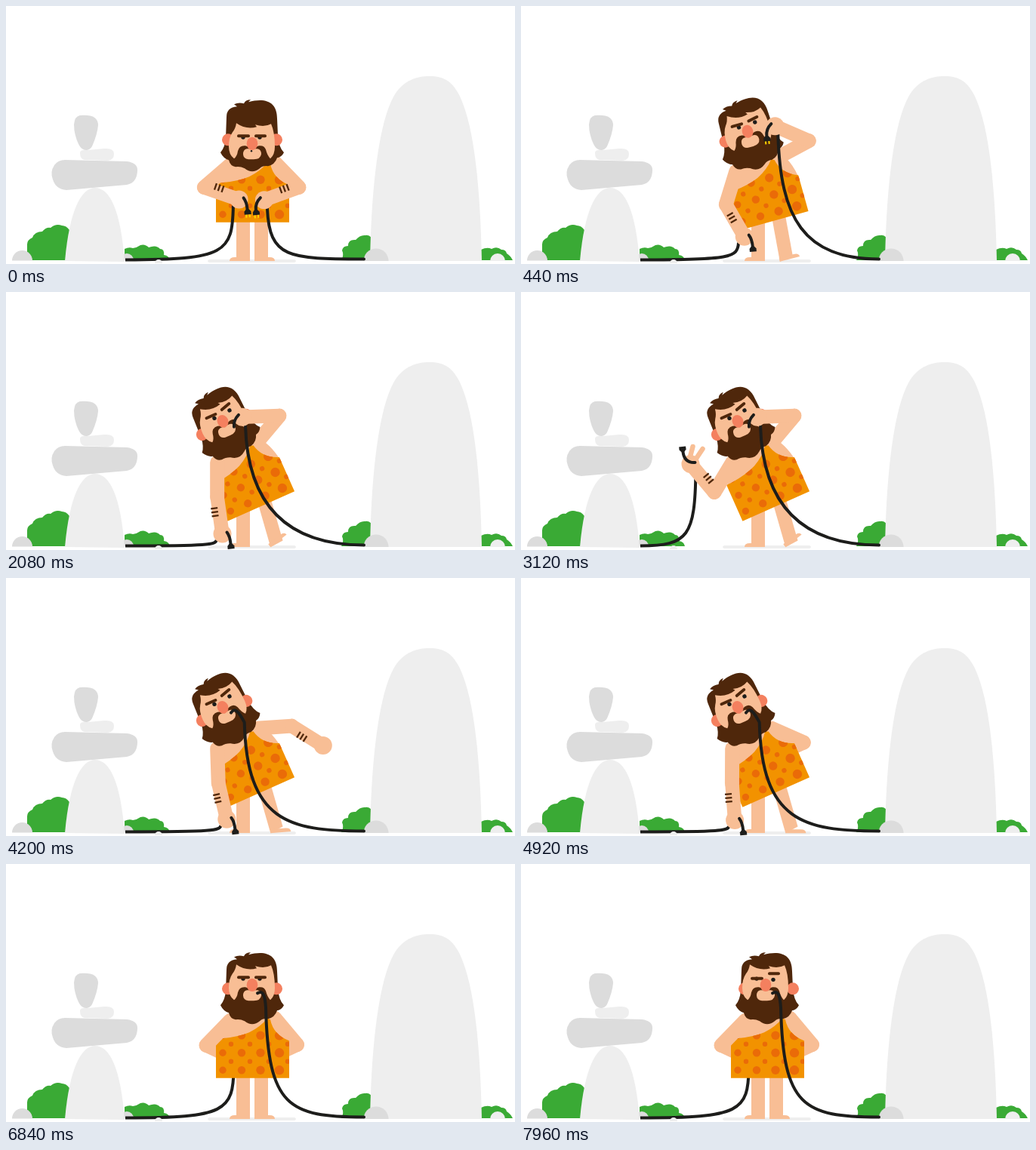
An HTML page with a canvas that plays this animation: 674x342 px, repeating every 8 s.

```html
<!DOCTYPE html>
<html lang="en">
<head>
<meta charset="utf-8">
<title>Caveman with cables</title>
<style>
html, body { margin: 0; width: 100%; height: 100%; overflow: hidden; background: #fff; }
canvas { display: block; width: 674px; height: 342px; }
</style>
</head>
<body>
<canvas id="stage" width="674" height="342"></canvas>
<script>
const ctx = document.getElementById('stage').getContext('2d');
const LOOP = 8000, RAD = Math.PI / 180;
const SKIN = '#f8be95', HAIR = '#4f270b', DRESS = '#f29200', SPOT = '#ea6b08', FLUSH = '#f4805f',
  CABLE = '#1d1d1b', LIGHT = '#eeeeee', STONE = '#dcdcdc', LEAF = '#3aaa35', YELLOW = '#ffd500', RED = '#e30613';

// Drawing helpers
const fill = (d, color) => { ctx.fillStyle = color; ctx.fill(new Path2D(d)); };
const stroke = (d, color, width, cap = 'round') => {
  Object.assign(ctx, { strokeStyle: color, lineWidth: width, lineCap: cap });
  ctx.stroke(new Path2D(d));
};
const oval = (x, y, rx, color, ry = rx) => {
  ctx.fillStyle = color;
  ctx.beginPath();
  ctx.ellipse(x, y, rx, ry, 0, 0, 7);
  ctx.fill();
};
const dome = (x, y, r, color) => fill(`M${x - r} ${y}A${r} ${r} 0 0 1 ${x + r} ${y}Z`, color);
const group = (draw, x = 0, y = 0, angle = 0) => {
  ctx.save();
  ctx.translate(x, y);
  ctx.rotate(angle * RAD);
  draw();
  ctx.restore();
};

// Smooth rise from 0 to 1 between two times
const rise = (t, from, to) => {
  const u = Math.max(0, Math.min(1, (t - from) / (to - from)));
  return u * u * (3 - 2 * u);
};
const pulse = (t, a, b, c, d) => rise(t, a, b) - rise(t, c, d);

// Arm poses: angles of upper arm and forearm; each move starts and ends at the given times
const LEFT_START = [139, 19], RIGHT_START = [46, 160];
const LEFT_MOVES = [
  { from: 200, to: 600, pose: [90, 82] },      // down to the ground
  { from: 2300, to: 2750, pose: [121, 230] },  // plug held up
  { from: 3450, to: 3850, pose: [88, 77] },
  { from: 4700, to: 5100, pose: [92, 92] },
  { from: 5960, to: 6300, pose: [134, 25] }    // behind the back
];
const RIGHT_MOVES = [
  { from: 200, to: 640, pose: [-84, 236] },    // plug overhead
  { from: 1350, to: 1680, pose: [-50, 178] },  // plug to the mouth
  { from: 3400, to: 3650, pose: [-45, 290] },
  { from: 3650, to: 4100, pose: [-4, 392] },   // flung out
  { from: 4250, to: 4700, pose: [24, 515] },
  { from: 5960, to: 6300, pose: [50, 515] }    // behind the back
];
const poseAt = (start, moves, t) => moves.reduce(
  (now, m) => now.map((v, i) => v + (m.pose[i] - v) * rise(t, m.from, m.to)), start);

function drawScenery() {
  fill('M28 337V316Q28 310 35 307Q38 299 48 299Q53 293 59 294Q66 288 74 291Q80 291 84 297V337Z', LEAF);
  fill('M157 337V322Q163 319 168 321Q174 320 178 317Q184 315 189 320Q199 316 204 322Q210 322 209 330Q216 331 217 337Z', LEAF);
  fill('M444 337Q448 330 445 324Q446 318 453 318Q453 309 463 310Q469 303 476 304Q480 303 484 307V337Z', LEAF);
  fill('M629 337V323Q637 319 643 322Q650 318 656 323Q662 323 663 328Q668 331 671 337Z', LEAF);
  dome(21.5, 337.5, 13.5, STONE);
  dome(160, 337, 9, STONE);
  dome(651, 338, 10, LIGHT);
  fill('M78 338C84 270 100 241 118 241C137 241 152 270 157 339Z', LIGHT);
  fill('M78 204L160 206Q174 208 174 217Q174 234 160 237L80 244Q66 243 62 230Q58 220 64 211Q69 204 78 204', STONE);
  fill('M98 195Q98 190 108 191L130 189Q143 188 143 196Q143 204 135 205L104 204Q98 203 98 195', LIGHT);
  fill('M98 145Q122 143 122 158Q121 170 114 186Q111 191 106 191Q100 191 96 183Q90 170 90 157Q91 146 98 145', STONE);
  fill('M482 338C484 230 495 150 515 117C527 98 545 93 561 93C580 93 592 100 602 122C620 162 628 240 630 338Z', LIGHT);
  dome(490, 338, 16.5, STONE);
  fill('M269 336H382Q386 338 382 340H269Q265 338 269 336', LIGHT);
}

function drawLegs(lean, tilt) {
  fill('M305 276H323V338H296Q296 333 303 333H305Z', SKIN);
  group(() => {
    fill('M-9 0H9V54L-9 58Z', SKIN);
    group(() => fill('M0 0H27Q27 -5 20 -5H0Z', SKIN), -9, 58, tilt + 16 * lean);
  }, 338 + 5 * lean, 280, -16 * lean);
}

function drawTorso() {
  const dress = 'M278 231H286Q308 229 322 223Q338 215 346 204L350 206Q354 226 375 234V283.5H278Z';
  fill('M300 194H356Q372 212 375 240L278 240Q284 212 300 194Z', SKIN);
  fill(dress, DRESS);
  ctx.save();
  ctx.clip(new Path2D(dress));
  // Staggered rows of large and small spots
  for (let row = 0; row < 5; row++) for (let col = 0; col < 4; col++) {
    const small = row % 2;
    oval(287 + 25 * col + 11 * small, 227 + 11.5 * row, small ? 3.2 : 4.7 + 0.5 * col, SPOT);
  }
  ctx.restore();
}

function drawHead({ lean, down, glance, lick, pursed }) {
  const lift = 0.8 * lean + 0.9 * glance, side = -2 * glance;
  fill('M291 168L292 140Q292 127 306 126L302 123Q308 120 315 122Q317 117 324 117L321 120C343 114 359 119 359 142' +
    'L360 164Q361 180 368 187Q365 193 359 194Q356 203 347 205Q340 204 336 208Q326 216 316 208' +
    'Q310 205 304 206Q297 205 295 197Q288 195 284 187Q290 180 291 168Z', HAIR);
  for (const x of [294, 358]) oval(x - side, 165 + 5 * down, 8, FLUSH);
  group(() => {
    fill('M295 164Q295 152 300 145Q304 140 305 133Q318 142 332 138L330 135Q342 139 351 134Q356 145 356 164' +
      'Q356 175 350 180Q346 176 344 168Q342 162 335 163L326 166L317 163Q309 162 307 170Q306 177 302 180Q295 175 295 164Z', SKIN);
    fill('M319 167H333Q338 168 338 174Q337 181 328 181H321Q314 180 314 174Q314 168 319 167Z', SKIN);
    if (lick > 0.05) oval(317, 169, 4.5 * lick, RED, 3 * lick);
    if (pursed) oval(325, 170, 1.2, CABLE);
    oval(314 + 3.5 * lean, 151.8, 2.7, CABLE);
    oval(336 + 4 * lean, 151.8 + 1.4 * lift - 2.5 * lean, 2.7, CABLE);
    const leftBrow = 150 - 2.5 * lean + 1.4 * glance, rightBrow = 150 - 5.6 * lift;
    stroke(`M308 ${leftBrow}H321`, HAIR, 4);
    stroke(`M331 ${rightBrow}L343 ${rightBrow - 3.5 * lean}`, HAIR, 4);
    oval(326, 160, 7.3, FLUSH, 8.6);
  }, side, 15 * down);
}

function solveArm([sx, sy], [upper, fore]) {
  const ex = sx + 46 * Math.cos(upper * RAD), ey = sy + 46 * Math.sin(upper * RAD);
  return { sx, sy, ex, ey, fore, hx: ex + 49 * Math.cos(fore * RAD), hy: ey + 49 * Math.sin(fore * RAD) };
}
const drawUpper = a => stroke(`M${a.sx} ${a.sy}L${a.ex} ${a.ey}`, SKIN, 19);
const drawFore = a => stroke(`M${a.ex} ${a.ey}L${a.hx} ${a.hy}`, SKIN, 18.5);
const drawHand = a => oval(a.hx, a.hy, 12, SKIN);
const drawBands = (a, offset) => group(() => {
  for (let x = 14; x < 26; x += 5) stroke(`M${x} ${offset - 4.5}V${offset + 4.5}`, HAIR, 2.3, 'butt');
}, a.ex, a.ey, a.fore);

// Short piece of cable out of a fist, ending in a plug
function drawLead(a, sx, sy, [cx, cy, ex, ey], plug, prongs) {
  group(() => {
    stroke(`M${sx} ${sy}Q${cx} ${cy} ${ex} ${ey}`, CABLE, 4);
    if (plug) group(() => {
      if (prongs) stroke('M6 -2.2H11M6 2.2H11', YELLOW, 2, 'butt');
      fill('M0 -2L3 -4.5H7V4.5H3L0 2Z', CABLE);
    }, ex, ey, Math.atan2(ey - cy, ex - cx) / RAD);
  }, a.hx, a.hy);
}

function draw(t) {
  const lean = pulse(t, 200, 600, 5960, 6300), down = 1 - rise(t, 150, 450);
  const raised = pulse(t, 2300, 2750, 3450, 3850);
  const drop = 3 * (1 - rise(t, 200, 600)) - 2 * pulse(t, 6100, 6260, 6260, 6460);
  const face = { lean, down, glance: rise(t, 7560, 7720), lick: pulse(t, 520, 700, 1380, 1560), pursed: t < 400 };

  // The upper body turns as one piece around the hem of the dress
  const pivot = [327 + 11 * lean, 283.3 + drop], angle = -24 * lean;
  const cos = Math.cos(angle * RAD), sin = Math.sin(angle * RAD);
  const onBody = (x, y) => {
    const dx = x - 327, dy = y - 283;
    return [pivot[0] + dx * cos - dy * sin, pivot[1] + dx * sin + dy * cos];
  };
  const inBody = part => group(() => group(part, -327, -283), ...pivot, angle);

  const left = solveArm(onBody(297, 207), poseAt(LEFT_START, LEFT_MOVES, t));
  const right = solveArm(onBody(356, 204), poseAt(RIGHT_START, RIGHT_MOVES, t));
  const leftBehind = t > 6000, rightBehind = t > 4480, inMouth = t > 3380;
  const lead = [10 - 18 * raised, 3 - 4 * raised, 11 - 21 * raised, 13 - 29 * raised];

  const leftCable = () => {
    const x = left.hx - 0.7 * lead[2], y = left.hy + 8;
    stroke(`M158 336.5C${x - 10} 336.5 ${x - 1} ${y + 0.88 * (336 - y)} ${x} ${y}`, CABLE, 4, 'butt');
    dome(202, 341, 5, LIGHT);
  };
  const rightCable = () => {
    const [x, y] = inMouth ? onBody(344, 190) : [right.hx + 4, right.hy + 11];
    const hook = inMouth ? `C${onBody(343, 175)} ${onBody(341, 166)} ${onBody(333, 171)}` : '';
    const slack = 30 * rise(t, 3400, 3800);
    stroke(`M474 335.5C374 335.5 ${x + 3} ${187 + 0.55 * y + slack} ${x} ${y}${hook}`, CABLE, 4);
  };

  ctx.fillStyle = '#fff';
  ctx.fillRect(0, 0, 674, 342);
  drawScenery();

  drawUpper(right);
  if (rightBehind) { drawFore(right); drawHand(right); }
  drawLegs(lean, -38 * pulse(t, 300, 640, 3500, 4400));
  if (leftBehind) { leftCable(); drawFore(left); drawHand(left); }
  inBody(drawTorso);
  drawUpper(left);

  if (!leftBehind) {
    leftCable();
    drawFore(left);
    drawBands(left, 12 * lean - 6);
    drawHand(left);
    if (raised > 0.05) group(() =>
      stroke(`M-2 -4L${3 * raised} ${-23 * raised}M4 -2L${16 * raised} ${-20 * raised}`, SKIN, 6.5), left.hx, left.hy);
    drawLead(left, 6, -2, lead, true, t < 400);
  }

  inBody(() => group(() => drawHead(face), 0, 4 * down));

  if (!rightBehind) {
    drawFore(right);
    if (right.hy > right.sy) drawBands(right, 5);
  }
  rightCable();
  if (!rightBehind) drawHand(right);
  if (!inMouth) drawLead(right, -5, -3, [-12, 4, -11, 13], t < 1600, true);
}

function frame(now) {
  draw(now % LOOP);
  requestAnimationFrame(frame);
}
requestAnimationFrame(frame);
</script>
</body>
</html>
```
